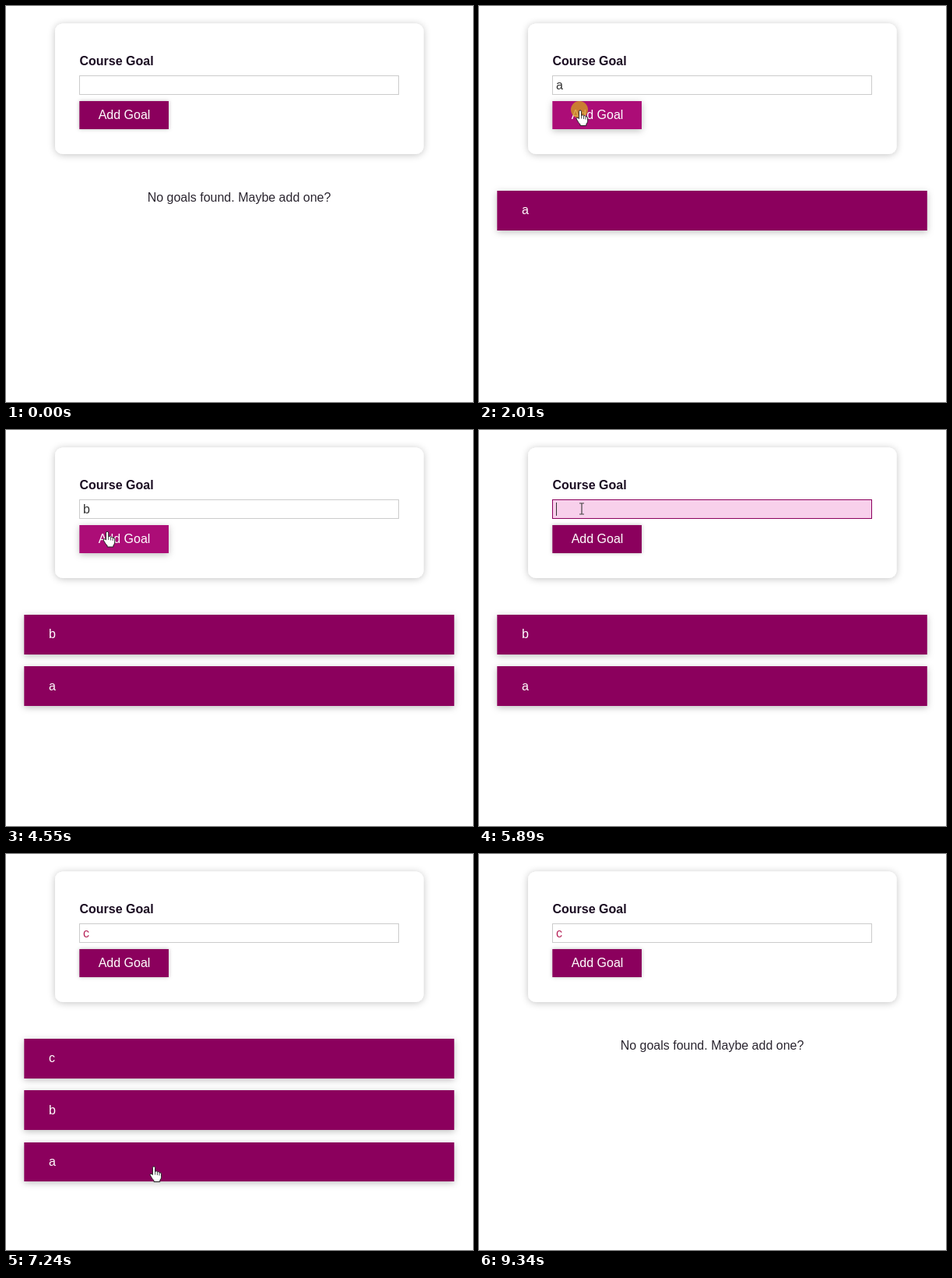
An HTML page for the animation above (9.61 s loop, 600 by 508 pixels).

```html
<!DOCTYPE html>
<html lang="en">
<head>
<meta charset="utf-8">
<title>Course goals</title>
<style>
  html, body { margin: 0; width: 100%; height: 100%; overflow: hidden; background: #fff; }
  svg { display: block; width: 600px; height: 508px; }
  text { font: 16px "Liberation Sans", Arial, sans-serif; fill: #333; }
  .bold { font-weight: bold; fill: #1b0d22; }
  .light { fill: #fff; }
  .bar { fill: #8b005d; filter: url(#barShadow); }
  #card { fill: #fff; filter: url(#cardShadow); }
  #empty { fill: #2b2630; }
  #button { fill: #8b005d; filter: url(#buttonShadow); }
  #button.hover { fill: #ac0e77; filter: url(#barShadow); }
  #field { fill: #fff; stroke: #ccc; }
  #field.focus { fill: #f8d0eb; stroke: #8b005d; }
</style>
</head>
<body>
<svg viewBox="0 0 600 508">
  <defs>
    <filter id="cardShadow" filterUnits="userSpaceOnUse" x="0" y="0" width="600" height="508">
      <feDropShadow dx="0" dy="1" stdDeviation="5" flood-opacity=".24"/>
    </filter>
    <filter id="barShadow" filterUnits="userSpaceOnUse" x="0" y="0" width="600" height="508">
      <feDropShadow dx="0" dy="2" stdDeviation="4" flood-opacity=".26"/>
    </filter>
    <filter id="buttonShadow" filterUnits="userSpaceOnUse" x="0" y="0" width="600" height="508">
      <feDropShadow dx="0" dy="0" stdDeviation="2.5" flood-opacity=".26"/>
    </filter>
  </defs>

  <rect id="card" x="63" y="22.5" width="473.5" height="167.5" rx="10"/>
  <text class="bold" x="94.5" y="76">Course Goal</text>
  <rect id="field" x="94.5" y="89.5" width="410" height="24"/>
  <text id="value" x="99" y="107"></text>
  <path id="caret" d="M0 93V110" stroke="#333"/>
  <rect id="button" x="94.3" y="122" width="114.7" height="36"/>
  <text class="light" x="118.7" y="145">Add Goal</text>
  <text id="empty" x="299.5" y="251" text-anchor="middle">No goals found. Maybe add one?</text>

  <g class="item"><rect class="bar" x="23.3" width="552.5"/><text class="light" x="55"></text></g>
  <g class="item"><rect class="bar" x="23.3" width="552.5"/><text class="light" x="55"></text></g>
  <g class="item"><rect class="bar" x="23.3" width="552.5"/><text class="light" x="55"></text></g>

  <g id="pointer">
    <circle id="spot" r="11" fill="#d29821" opacity=".8"/>
    <path id="arrow" d="M0 0V16.2L3.8 12.7L6.3 18.4L9 17.2L6.5 11.7H11.6Z" fill="#fff" stroke="#333"/>
    <path id="beam" d="M-1 -6H5M2 -6V8M-1 8H5" fill="none" stroke="#444" stroke-width="1.2"/>
    <g id="hand" stroke="#222" stroke-linejoin="round">
      <path d="M-.6 2.6Q-.6 .8 1 .8T2.6 2.6V7.2Q4.8 6.2 5.4 7.8Q7.4 7 8 8.7Q10.6 8.2 10.6 10.8V14.5Q10.4 17 8.8 18.6V20.5H1V18.8Q-1.2 16.8 -2.5 14.2L-4 11.6Q-3.6 9.3 -1.4 10.6L-.6 11.6Z" fill="#fff"/>
      <path d="M2.6 7V11.5M5.4 8V12M8 9V12.5" fill="none" stroke-width=".8"/>
    </g>
  </g>
</svg>
<script>
const LOOP = 9610, STEP = 66.5, BLINK = 530, LAG = 70;
const FIRST = 237, PITCH = 66.4, HEIGHT = 50.5;
const BUTTON = [129, 133], ENTRY = [395, 395];

// Pointer travels: start time, end time, destination
const moves = [
  [130, 930, [309, 101]], [1200, 1660, BUTTON],
  [2280, 2480, [138, 98]], [3880, 4240, BUTTON],
  [4480, 4810, [130, 100]], [5890, 6020, [124, 77]], [6160, 6640, BUTTON],
  [6980, 7240, [189, 400]], [7720, 8060, [188, 336]], [8400, 8530, [188, 275]],
  [8930, 9340, [420, 512]]
];
const clicks = [1000, 1930, 2620, 4280, 4810, 6840, 7510, 8260, 8800];
const keys = [[1140, 'a'], [3290, ''], [3550, 'b'], [5350, ''], [5960, 'c']];
const events = [...clicks.map(time => ({ time })), ...keys.map(([time, key]) => ({ time, key }))]
  .sort((a, b) => a.time - b.time);

const $ = id => document.getElementById(id);
const rows = [...document.querySelectorAll('.item')];
const show = (el, on) => el.setAttribute('visibility', on ? 'visible' : 'hidden');
const place = (el, x, y) => el.setAttribute('transform', `translate(${x} ${y})`);
const smooth = k => k * k * (3 - 2 * k);
const rowTop = i => Math.round(FIRST + PITCH * i);
const rowEnd = i => Math.round(FIRST + PITCH * i + HEIGHT);

function pointerAt(t) {
  let [x, y] = ENTRY;
  for (const [from, to, [tx, ty]] of moves) {
    if (t < from) break;
    const k = t >= to ? 1 : smooth(Math.floor((t - from) / STEP) * STEP / (to - from));
    x += (tx - x) * k;
    y += (ty - y) * k;
  }
  return [x, y];
}

function hit([x, y], count) {
  if (x >= 94 && x <= 505 && y >= 89 && y <= 114) return 'field';
  if (x >= 94 && x <= 209 && y >= 122 && y <= 158) return 'button';
  const i = Math.floor((y - FIRST) / PITCH);
  return i >= 0 && i < count && y <= rowEnd(i) ? 'item' : 'page';
}

// Replays the clicks and keys up to time t.
function stateAt(t) {
  const s = { value: '', goals: [], focus: false, blinkFrom: 0, pressed: false };
  for (const { time, key } of events) {
    if (time > t) break;
    if (key !== undefined) {
      s.value = key;
      if (key) s.blinkFrom = time;
      continue;
    }
    const at = pointerAt(time), target = hit(at, s.goals.length);
    s.focus = target === 'field';
    s.pressed = t - time < (s.focus ? LAG : 2 * LAG);
    if (s.focus) s.blinkFrom = time;
    if (t < time + LAG) continue;
    if (target === 'button') s.goals.unshift(s.value);
    if (target === 'item') s.goals.splice(Math.floor((at[1] - FIRST) / PITCH), 1);
  }
  return s;
}

function draw(t) {
  const { value, goals, focus, blinkFrom, pressed } = stateAt(t);
  $('field').classList.toggle('focus', focus);
  $('value').textContent = value;
  $('value').style.fill = value === 'c' && !focus ? '#b8285c' : '#333';
  place($('caret'), 99.5 + $('value').getComputedTextLength(), 0);
  show($('caret'), focus && (t - blinkFrom) % (2 * BLINK) < BLINK);
  show($('empty'), !goals.length);
  rows.forEach((row, i) => {
    show(row, i < goals.length);
    row.lastChild.textContent = goals[i] || '';
  });

  const inside = t >= moves[0][0] && t < moves.at(-1)[1];
  const p = pointerAt(t), over = inside && hit(p, goals.length);
  place($('pointer'), ...p);
  show($('arrow'), over === 'page');
  show($('beam'), over === 'field');
  show($('hand'), over === 'button' || over === 'item');
  show($('spot'), inside && pressed);
  $('button').classList.toggle('hover', over === 'button');
}

rows.forEach((row, i) => {
  row.firstChild.setAttribute('y', rowTop(i));
  row.firstChild.setAttribute('height', rowEnd(i) - rowTop(i));
  row.lastChild.setAttribute('y', Math.round(267.4 + PITCH * i));
});

const start = performance.now();
function tick() {
  draw((performance.now() - start) % LOOP);
  requestAnimationFrame(tick);
}
tick();
</script>
</body>
</html>
```
